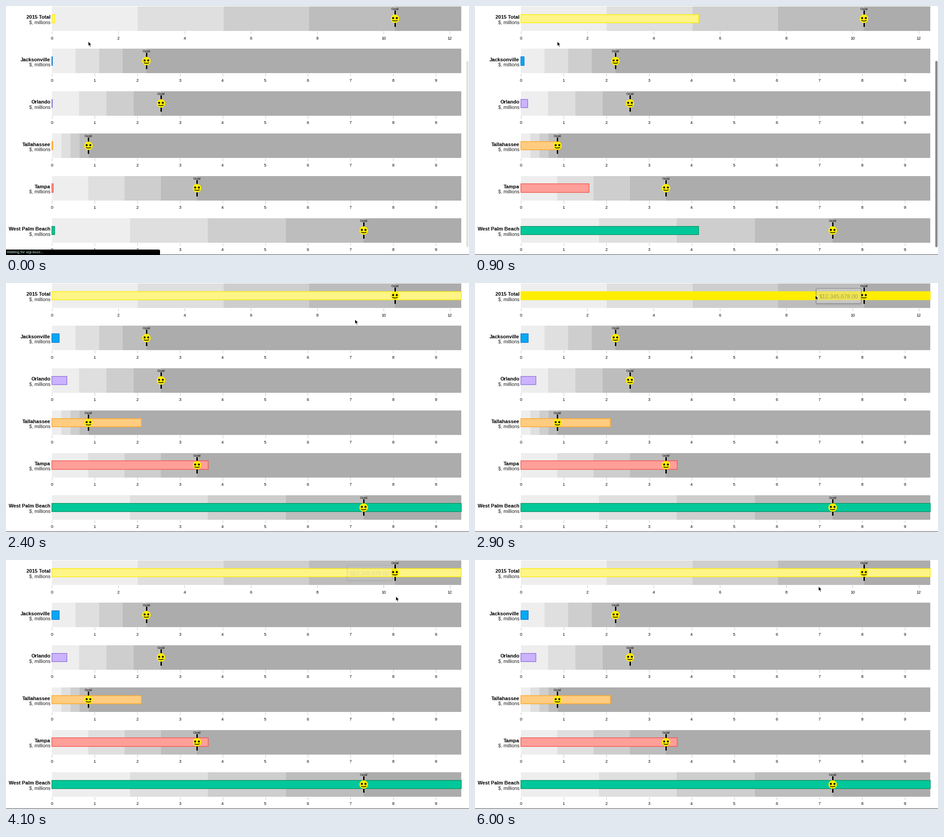
Animation, 1019 px wide and 549 px high, one loop 6100 ms. Source, as a matplotlib script:

```python
import matplotlib.pyplot as plt
import numpy as np
from matplotlib.animation import FuncAnimation
from matplotlib.patches import Circle, FancyBboxPatch, Polygon, Rectangle

W, H, DPI = 1019, 549, 64
PT = 72 / DPI                       # points per pixel
STEP, FRAMES = 100, 61
X0, X1 = 101.5, 1002
ROW_STEP, BAND_H = 93.4, 54
GREYS = ["#eeeeee", "#dfdfdf", "#cecece", "#bdbdbd", "#acacac"]

# name, axis max, tick step, goal, value, fill, stroke
ROWS = [
    ("2015 Total", 12.3457, 2, 10.345, 12.3457, "#fff587", "#ffee00"),
    ("Jacksonville", 9.6, 1, 2.213, 0.163, "#03a9f4", "#0277d0"),
    ("Orlando", 9.6, 1, 2.554, 0.345, "#ccb3ff", "#9575dd"),
    ("Tallahassee", 9.6, 1, 0.853, 2.1, "#ffcc80", "#ffa726"),
    ("Tampa", 9.6, 1, 3.4, 3.665, "#ff9f99", "#f4584f"),
    ("West Palm Beach", 9.6, 1, 7.31, 9.6, "#00c89b", "#009765"),
]

plt.rcParams["font.family"] = "Liberation Sans"
fig = plt.figure(figsize=(W / DPI, H / DPI), dpi=DPI, facecolor="white")
ax = fig.add_axes([0, 0, 1, 1])
ax.set_xlim(0, W)
ax.set_ylim(H, 0)
ax.axis("off")


def rect(x, y, w, h, color, z=1, **kw):
    return ax.add_patch(Rectangle((x, y), w, h, fc=color, zorder=z, **{"lw": 0, **kw}))


def label(x, y, s, size, z=6, **kw):
    return ax.text(x, y, s, fontsize=size * PT, zorder=z, va="baseline", **kw)


def face(x, y):
    ax.add_patch(Circle((x, y), 9.3, fc="#ffee00", lw=0, zorder=5))
    for dx in (-4, 4):
        ax.add_patch(Circle((x + dx, y - 1.4), 2.2, fc="black", lw=0, zorder=5))
    u = np.linspace(-1, 1, 15)
    ax.plot(x + 5 * u, y + 4.9 - 1.0 * u**2, color="black", lw=1.5 * PT, zorder=5)


def build_row(i, name, top_value, tick, goal, value, fill, stroke):
    top = 1 + i * ROW_STEP
    mid, bottom = top + BAND_H / 2, top + BAND_H

    def scale(v):
        return X0 + v / top_value * (X1 - X0)

    edges = [scale(goal * k / 4) for k in range(5)] + [X1]
    for a, b, grey in zip(edges, edges[1:], GREYS):
        rect(a, top, b - a, BAND_H, grey)
    for v in range(0, int(top_value) + 1, tick):
        ax.plot([scale(v)] * 2, [bottom + 0.5, bottom + 6], color="#c4c4c4", lw=PT, zorder=1)
        label(scale(v), bottom + 18.5, str(v), 9, ha="center")
    label(98, top + 27.3, name, 11, ha="right", weight="bold")
    label(98, top + 38.3, "$, millions", 10.5, ha="right", color="#222222")

    gx = scale(goal)
    rect(gx - 1.5, mid - 18, 3, 36, "black", z=4)
    face(gx, mid)
    label(gx, top + 8, "Goal", 8, ha="center")
    bar = rect(X0, mid - 9.2, 0, 18.4, fill, z=3, ec=stroke, lw=1.5 * PT)
    return bar, scale(value) - X0


bars = [build_row(i, *row) for i, row in enumerate(ROWS)]

# browser chrome
rect(0, 548, W, 1, "#3c3c3c", z=7)
scrollbar = ax.add_patch(FancyBboxPatch(
    (1015.5, 123.5), 0, 406, boxstyle="round,pad=2.5", fc="#8c8c8c", lw=0, zorder=7))
status = [
    ax.add_patch(FancyBboxPatch((-4, 540), 340, 14, boxstyle="round,pad=3",
                                fc="black", lw=0, zorder=8)),
    label(2, 545.2, "Waiting for wgi.buzz...", 8.2, z=9, color="#c8f0e4"),
]

# tooltip: soft shadow, box, text; each with its full opacity
TIP = (754, 15)


def tip_box(dy, pad, **kw):
    return ax.add_patch(FancyBboxPatch((TIP[0], TIP[1] + dy), 93, 27, zorder=10,
                                       boxstyle=f"round,pad={pad}", **kw))


tooltip = [(tip_box(1.5, pad, fc="black", lw=0), 0.09) for pad in (6, 5, 4)]
tooltip += [
    (tip_box(0, 3, fc="white", ec="#333333", lw=1.2 * PT), 1),
    (label(800.3, 33.2, "$12,345,678.00", 12.4, z=11, ha="center", color="#222222"), 1),
]

ARROW = np.array([(0, 0), (0, 10.4), (2.3, 8.3), (4.0, 12.2), (5.8, 11.4),
                  (4.2, 7.6), (7.4, 7.4)])
cursor = ax.add_patch(Polygon(ARROW, fc="black", ec="white", lw=0.9 * PT, zorder=12))

PATH_T = [0, 1200, 1600, 2400, 2900, 3600, 4100, 4800, 5600, 6000]
PATH_X = [181, 181, 318, 768, 749, 749, 858, 858, 756, 756]
PATH_Y = [78, 78, 58, 80, 27, 27, 80, 80, 58, 58]


def cubic_in_out(p):
    return 4 * p**3 if p < 0.5 else 1 - 4 * (1 - p) ** 3


def update(n):
    t = n * STEP
    grow = cubic_in_out(np.interp(t, [0, 900, 1600, 2270], [0.1145, 0.477, 0.745, 1]))
    for bar, full in bars:
        bar.set_width(full * grow)

    hover = 2800 <= t < 3700
    total = bars[0][0]
    total.set_facecolor(ROWS[0][6] if hover else ROWS[0][5])

    shown = np.interp(t, [2800, 3100, 3600, 4150], [0, 1, 1, 0])
    for part, alpha in tooltip:
        part.set_alpha(alpha * shown)

    scrollbar.set_alpha(np.interp(t, [0, 200, 1000, 1400], [0.25, 1, 1, 0]))
    for part in status:
        part.set_visible(t < 400)

    tip = np.interp(t, PATH_T, PATH_X), np.interp(t, PATH_T, PATH_Y)
    cursor.set_xy(ARROW + tip)
    return []


anim = FuncAnimation(fig, update, frames=FRAMES, interval=STEP, repeat=True,
                     repeat_delay=0, blit=False)
plt.show()
```
